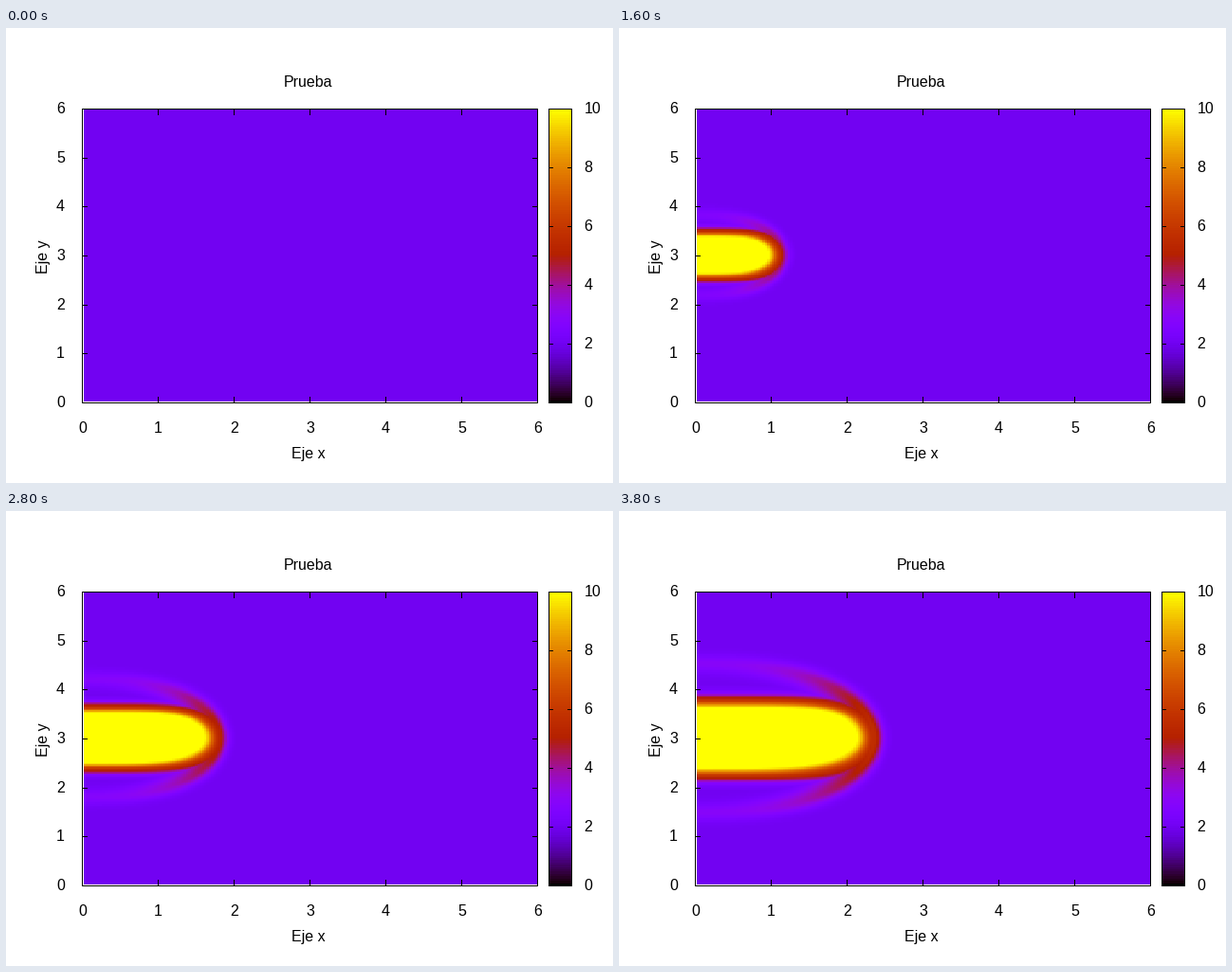
These frames come from a looping animation (640 by 480 pixels, 4000 ms). A matplotlib script:

```python
import numpy as np
import matplotlib.pyplot as plt
from matplotlib.animation import FuncAnimation
from matplotlib.colors import ListedColormap
from matplotlib.patches import Rectangle

W, H, DPI = 640, 480, 100
FRAMES, INTERVAL = 20, 200
LEFT, RIGHT, TOP, BOTTOM = 80, 560, 85, 395
BAR_L, BAR_R = 572, 596
CELLS = 200

plt.rcParams["font.family"] = "Liberation Sans"
fig = plt.figure(figsize=(W / DPI, H / DPI), dpi=DPI, facecolor="white")
ax = fig.add_axes([0, 0, 1, 1])

# Palette: red = sqrt(g), green = g^3, blue = sin(2 pi g)
g = np.linspace(0, 1, 256)
palette = ListedColormap(np.column_stack(
    [np.sqrt(g), g ** 3, np.clip(np.sin(2 * np.pi * g), 0, 1)]))

# Cell centres in pixels: u along the jet, v above its axis
step = (np.arange(CELLS) + 0.5) / CELLS
u, v = np.meshgrid(1 + step * (RIGHT - LEFT - 2),
                   240 - TOP - 1 - step * (BOTTOM - TOP - 2))

# Growth of the jet: half widths and lengths in pixels
STEPS = [1, 2, 4, 8, 12, 14, 16, 19]
CORE_W = [6, 9, 13, 20.5, 26, 28, 31, 34]
CORE_L = [9, 23, 43, 80, 114, 132, 148, 174]
EDGE_W = [8.5, 12.5, 18, 28, 33, 36, 39.5, 44]
EDGE_L = [14, 29, 52, 93, 128, 147, 165, 191]
BOW_W = [9, 15, 23, 42, 55, 62, 68.5, 78]


def distance(width, length, a, b):
    """Approximate signed distance to |v/width|^a + (u/length)^b = 1."""
    x = np.maximum(u, 0.1) / length
    y = np.maximum(np.abs(v), 0.1) / width
    f = x ** b + y ** a
    slope = np.hypot(b / length * x ** (b - 1), a / width * y ** (a - 1))
    return b * f * (1 - f ** (-1 / b)) / slope


def field(k):
    if k == 0:
        return np.full(u.shape, 2.0)
    core_w, core_l, edge_w, edge_l, bow_w = (
        np.interp(k, STEPS, p)
        for p in (CORE_W, CORE_L, EDGE_W, EDGE_L, BOW_W))

    # Dense core with a sheath fading into the background
    lean = np.where(v > 0, 3.8 + 0.13 * k, 3.8 + 0.03 * k)
    inner = distance(core_w, core_l, 2, lean)
    outer = distance(edge_w, edge_l, 2, 4 + 0.1 * k)
    s = inner / np.maximum(inner - outer, 2)
    sheath = np.interp(s, [-0.25, 0, 0.25, 0.5, 0.8, 1, 1.25, 1.6, 2],
                       [10, 9.1, 7.4, 6.1, 5.2, 4.3, 2.9, 2.3, 2])

    # Bow wave, stronger and thicker towards the head
    size = min(1, 0.55 + 0.025 * k)
    d = distance(bow_w, edge_l - 4 * size, 1.9, 2.5)
    ahead = np.clip(u / edge_l, 0, 1)
    sigma = size * np.where(d > 0, 6.5, 6.5 + 9 * ahead ** 2)
    height = 0.45 + 0.02 * k + 3 * size * ahead ** 2.5
    band = 2 + height * np.exp(-0.5 * (d / sigma) ** 2)
    return np.maximum(sheath, band)


def paint(data, x0, x1, y0, y1):
    """Fill the pixels x0..x1-1, y0..y1-1; the small inset avoids round-up."""
    e = 0.1
    return ax.imshow(data, cmap=palette, vmin=0, vmax=10, aspect="auto",
                     interpolation="nearest",
                     extent=(x0 + e, x1 - e, y1 - e, y0 + e))


def line(x0, y0, x1, y1):
    """One pixel wide line, both end pixels included."""
    ax.add_patch(Rectangle((x0, y0), x1 - x0 + 1, y1 - y0 + 1, lw=0,
                           color="black", snap=False, zorder=3))


def box(x0, x1):
    line(x0, TOP, x1, TOP)
    line(x0, BOTTOM, x1, BOTTOM)
    line(x0, TOP, x0, BOTTOM)
    line(x1, TOP, x1, BOTTOM)


def label(x, y, s, ha="center", **kw):
    ax.text(x, y, s, ha=ha, va="baseline", fontsize=16 * 72 / DPI,
            color="black", **kw)


img = paint(field(0), LEFT + 2, RIGHT + 1, TOP, BOTTOM - 1)
paint(np.linspace(10, 0, 128)[:, None], BAR_L, BAR_R + 1, TOP, BOTTOM)
ax.set_xlim(0, W)
ax.set_ylim(H, 0)
ax.axis("off")

box(LEFT, RIGHT)
box(BAR_L, BAR_R)
for i in range(7):
    x = LEFT + 80 * i
    y = round(BOTTOM - (BOTTOM - TOP) * i / 6)
    line(x, BOTTOM - 6, x, BOTTOM)
    line(x, TOP, x, TOP + 6)
    line(LEFT, y, LEFT + 5, y)
    line(RIGHT - 5, y, RIGHT, y)
    label(x + 0.5, 427, str(i))
    label(62, y + 5, str(i), "right")
for i in range(6):
    y = BOTTOM - 62 * i
    line(BAR_L, y, BAR_L + 4, y)
    line(BAR_R - 4, y, BAR_R, y)
    label(609.5, y + 5, str(2 * i), "left")

label(318.5, 62, "Prueba")
label(318.5, 454, "Eje x")
label(44, 241, "Eje y", rotation=90, rotation_mode="anchor")


def update(k):
    img.set_data(field(k))
    return img,


anim = FuncAnimation(fig, update, frames=FRAMES, interval=INTERVAL,
                     repeat=True, repeat_delay=0, blit=False)
plt.show()
```
